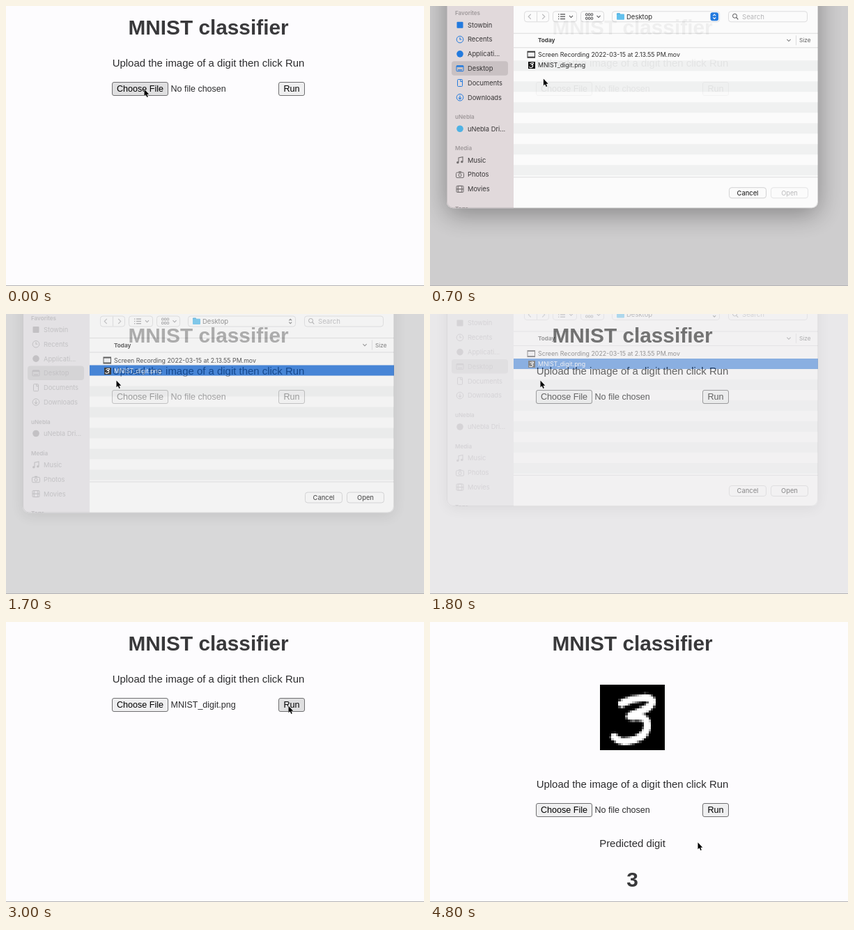
An HTML page with a canvas for the animation above (4900 ms loop, 600 px wide and 402 px high).

```html
<!DOCTYPE html>
<html lang="en">
<head>
<meta charset="utf-8">
<title>MNIST classifier</title>
<style>
  html, body { margin: 0; width: 100%; height: 100%; overflow: hidden; background: #fdfcfe; }
  canvas { display: block; }
</style>
</head>
<body>
<canvas id="stage" width="600" height="402"></canvas>
<script>
const W = 600, H = 402, LOOP = 4900, STEP = 100;
const OPEN = 500, SELECT = 1500, BLUR = 1600, CLOSED = 2000, RESULT = 3500;
const SANS = '"Liberation Sans", Arial, sans-serif';
const UI = 'Inter, Roboto, sans-serif';
const BLUE = '#1674e0', INK = '#39393b', EDGE = '#dededf';

const screen = document.getElementById('stage').getContext('2d');
const layer = newCanvas(W, H);
const digit = drawDigit();
let c = screen;

function newCanvas(w, h) {
  const el = document.createElement('canvas');
  el.width = w;
  el.height = h;
  return el.getContext('2d');
}

const glides = [
  { at: 400, ms: 400, x: 160, y: 103 },
  { at: 1000, ms: 400, x: 158, y: 95 },
  { at: 2200, ms: 450, x: 405, y: 120 },
  { at: 3900, ms: 600, x: 383, y: 323, power: 1 },
  { at: 4500, ms: 300, x: 384, y: 316 }
];

function pointer(t) {
  let x = 198, y = 119;
  for (const g of glides) {
    const u = Math.min(1, Math.max(0, (t - g.at) / g.ms));
    const k = 1 - (1 - u) ** (g.power || 2);
    x += (g.x - x) * k;
    y += (g.y - y) * k;
  }
  return { x, y };
}

// The sheet drops in with a decaying lag and leaves upwards
function sheet(t) {
  if (t <= BLUR) {
    const lag = Math.exp((OPEN - t) / 150);
    return { dy: -18 * lag, opacity: 1 - 0.28 * lag, dim: 0.225 - 0.135 * lag, lift: 6 * lag };
  }
  const u = (t - BLUR) / (CLOSED - BLUR);
  return { dy: -38 * u, opacity: (1 - u) ** 1.25, dim: 0.225 * (1 - u) ** 1.5, lift: 0 };
}

function text(s, x, y, size, color, font = UI, weight = 400, align = 'left') {
  c.font = `${weight} ${size}px ${font}`;
  c.textAlign = align;
  c.fillStyle = color;
  c.fillText(s, x, y);
}

function box(x, y, w, h, r, fill, stroke) {
  c.beginPath();
  c.roundRect(x, y, w, h, r);
  if (fill) { c.fillStyle = fill; c.fill(); }
  if (stroke) { c.strokeStyle = stroke; c.lineWidth = 1; c.stroke(); }
}

function rect(x, y, w, h, color) {
  c.fillStyle = color;
  c.fillRect(x, y, w, h);
}

function line(color, ...p) {
  c.beginPath();
  for (let i = 0; i < p.length; i += 2) c.lineTo(p[i], p[i + 1]);
  c.strokeStyle = color;
  c.lineWidth = 1.1;
  c.stroke();
}

function ring(x, y, r, color) {
  box(x - r, y - r, 2 * r, 2 * r, r, null, color);
}

function dot(x, y, r, color) {
  box(x - r, y - r, 2 * r, 2 * r, r, color);
}

const chevron = (x, y, w, h, color) => line(color, x - w, y - h, x, y + h, x + w, y - h);
const angle = (x, y, w, color) => line(color, x - w, y - 3.5, x + w, y, x - w, y + 3.5);

// A pen stroke on the 28 x 28 grid, rounded between a few points
function drawDigit() {
  const g = newCanvas(28, 28);
  const pen = [[9.5, 8], [14, 5.8], [23, 5.2], [22, 10], [10, 14], [21, 13.5], [20, 22], [10, 25], [6.3, 22.5]];
  g.fillRect(0, 0, 28, 28);
  g.strokeStyle = '#fff';
  g.lineWidth = 3.2;
  g.lineCap = g.lineJoin = 'round';
  g.beginPath();
  g.moveTo(...pen[0]);
  for (let i = 1; i < pen.length - 1; i++) {
    const [x, y] = pen[i], [u, v] = pen[i + 1];
    g.quadraticCurveTo(x, y, (x + u) / 2, (y + v) / 2);
  }
  g.lineTo(...pen.at(-1));
  g.stroke();
  return g.canvas;
}

function button(label, x, y, w, state) {
  const fill = { idle: '#efeff0', hover: '#dfdfe0', down: '#f6f6f6' }[state];
  box(x + 0.5, y + 0.5, w - 1, 19, 2.5, fill, '#6f6f71');
  text(label, x + w / 2, y + 14, 12.6, '#000', SANS, 400, 'center');
}

function form(t, pos) {
  const done = t >= RESULT, dy = done ? 151 : 0, top = 109 + dy;
  const free = t < OPEN || t >= CLOSED;
  const state = (x, w) => {
    const over = pos.x > x && pos.x < x + w && pos.y > top && pos.y < top + 20;
    return !free || !over ? 'idle' : t === 2900 ? 'down' : 'hover';
  };
  const heading = (s, y) => text(s, 290.5, y, 29.8, INK, SANS, 700, 'center');
  const label = (s, y) => text(s, 290.5, y, 14.95, '#2c2c2e', SANS, 400, 'center');

  heading('MNIST classifier', 41);
  label('Upload the image of a digit then click Run', 87 + dy);
  button('Choose File', 152, top, 81, state(152, 81));
  button('Run', 391, top, 38, state(391, 38));
  const file = t >= CLOSED && !done ? 'MNIST_digit.png' : 'No file chosen';
  text(file, 236.5, top + 14, 12.5, '#2c2c2e', SANS);
  if (done) {
    c.imageSmoothingEnabled = false;
    c.drawImage(digit, 243.5, 90.3, 93.7, 93.5);
    label('Predicted digit', 323);
    heading('3', 380);
  }
}

const icons = {
  plain(x, y, k) { box(x - 4.5, y - 4.5, 9, 9, 1, k); },
  round(x, y, k) { dot(x, y, 4.8, k); },
  clock(x, y, k) {
    ring(x, y, 4.8, k);
    line(k, x, y - 3, x, y, x + 2.4, y);
  },
  desk(x, y, k) {
    box(x - 5, y - 4, 10, 8, 1, null, k);
    rect(x - 5, y - 4, 10, 2, k);
    rect(x - 3, y + 1.5, 6, 1.2, k);
  },
  doc(x, y, k) {
    box(x - 3.5, y - 5, 7, 10, 1, null, k);
    line(k, x + 1, y - 5, x + 1, y - 2, x + 3.5, y - 2);
  },
  down(x, y, k) {
    ring(x, y, 4.8, k);
    line(k, x, y - 2.8, x, y + 2.5);
    chevron(x, y + 1.4, 2, 1.1, k);
  },
  note(x, y, k) {
    line(k, x - 2, y + 3, x - 2, y - 3.4, x + 4, y - 4.6, x + 4, y + 2);
    dot(x - 3.2, y + 3.4, 1.7, k);
    dot(x + 2.8, y + 2.4, 1.7, k);
  },
  photo(x, y, k) {
    box(x - 5.5, y - 3, 11, 7.5, 1.5, null, k);
    rect(x - 2, y - 4.6, 4, 1.6, k);
    ring(x, y + 0.7, 2.1, k);
  },
  film(x, y, k) {
    box(x - 5, y - 4.5, 10, 9, 1, null, k);
    box(x - 2.7, y - 4.5, 5.4, 9, 0, null, k);
    line(k, x - 5, y, x + 5, y);
  }
};

const groups = [
  { name: 'Favorites', color: BLUE, items: { Stowbin: 'plain', Recents: 'clock', 'Applicati...': 'round',
    Desktop: 'desk', Documents: 'doc', Downloads: 'down' } },
  { name: 'uNebla', color: '#45b0e6', items: { 'uNebla Dri...': 'round' } },
  { name: 'Media', color: '#6b6667', items: { Music: 'note', Photos: 'photo', Movies: 'film' } },
  { name: 'Tags', items: {} }
];

function sidebar(active) {
  const faded = '#bab8bc';
  rect(24, -60, 96, 360, active ? '#e3dbdd' : '#e8e6e9');
  box(31, 84, 81, 20.5, 4, active ? '#c9c1c3' : '#d5d3d6');
  let y = 15;
  for (const { name, color, items } of groups) {
    text(name, 36, y + 3, 8.1, active ? '#9c9597' : faded, UI, 600);
    y += 17;
    for (const [label, icon] of Object.entries(items)) {
      icons[icon](43, y, active ? color : faded);
      text(label, 54, y + 3.4, 9.3, active ? '#2b2829' : faded);
      y += 20.8;
    }
    y += 7.2;
  }
}

function toolbar(active) {
  const ink = active ? '#4c4c4e' : '#9a9a9c';
  const frame = (x, w) => box(x + 0.5, 12.5, w - 1, 15, 3.5, '#fff', EDGE);
  frame(135, 36);
  line(EDGE, 153.5, 13, 153.5, 27);
  angle(143, 20, -1.8, '#b9b9bb');
  angle(163, 20, 1.8, '#b9b9bb');

  frame(176, 35);
  frame(216, 34);
  for (let i = 0; i < 3; i++) {
    rect(184, 16 + i * 3.3, 1.4, 1.3, ink);
    rect(187, 16 + i * 3.3, 7, 1.3, ink);
    for (const y of [15.5, 21]) box(223.5 + i * 3.8, y, 2.6, 3, 0.5, null, ink);
  }
  chevron(202.5, 20, 2.5, 1.3, ink);
  chevron(242, 20, 2.5, 1.3, ink);

  frame(261, 155);
  box(268, 15, 5, 4, 1, '#39a5dc');
  box(268, 16.2, 11, 8.3, 1, '#5bc1f0');
  text('Desktop', 282, 23.4, 9.5, active ? '#222' : '#777');
  if (active) box(402.5, 14, 11.5, 12, 3, BLUE);
  for (const s of [-1, 1]) chevron(408.2, 20 + s * 2.2, 2, s, active ? '#fff' : '#777');

  frame(428, 114);
  ring(437.5, 19, 3, ink);
  line(ink, 439.7, 21.2, 442.3, 24);
  text('Search', 448, 23.4, 9.6, '#b4b4b6');
}

function list(lift, chosen) {
  for (let y = 83; y < 248; y += 30) rect(120, y, 437, 15, '#f3f4f4');
  if (chosen) rect(120, 83, 437, 15, '#0a62d6');
  c.save();
  c.beginPath();
  c.rect(120, 68, 437, 181);
  c.clip();
  c.translate(0, -lift);
  rect(139.5, 71, 11.5, 10, '#2a2a2a');
  rect(140.5, 73, 9.5, 6, '#f5f5f6');
  text('Screen Recording 2022-03-15 at 2.13.55 PM.mov', 155, 79.3, 8.8, '#222');
  c.drawImage(digit, 140.5, 86, 10, 10);
  text('MNIST_digit.png', 155, 94.3, 8.8, chosen ? '#fff' : '#222');
  c.restore();
}

function dialog(t, lift) {
  const chosen = t >= SELECT, active = t < BLUR;
  c.save();
  c.shadowColor = `rgba(0,0,0,${active ? 0.38 : 0.14})`;
  c.shadowBlur = active ? 36 : 20;
  c.shadowOffsetY = active ? 9 : 4;
  box(24, -60, 533, 355, 9, '#fff');
  c.restore();

  c.save();
  c.beginPath();
  c.roundRect(24, -60, 533, 355, 9);
  c.clip();
  sidebar(active);
  toolbar(active);
  for (const y of [43.5, 64, 250]) rect(120, y, 437, 1, EDGE);
  text('Today', 155, 57, 8.2, '#333', UI, 700);
  chevron(515, 54, 2.6, 1.3, '#777');
  rect(525, 47, 1, 14, EDGE);
  text('Size', 530, 57, 8.2, '#555');
  list(lift, chosen);
  const action = (s, x, on) => {
    box(x + 0.5, 265.5, 53, 15, 3.5, '#fff', on ? '#d2d2d3' : '#e6e6e7');
    text(s, x + 27, 276.3, 9.3, on ? '#222' : '#b9b9bb', UI, on ? 500 : 400, 'center');
  };
  action('Cancel', 429, true);
  action('Open', 489, chosen);
  c.restore();
  box(24.5, -60, 532, 354.5, 9, null, 'rgba(0,0,0,.13)');
}

function arrow({ x, y }) {
  c.save();
  c.translate(x + 0.5, y + 0.5);
  c.beginPath();
  c.moveTo(0, 0);
  c.lineTo(0, 9.8);
  c.lineTo(2.2, 7.7);
  c.lineTo(3.9, 11.4);
  c.lineTo(5.3, 10.8);
  c.lineTo(3.8, 7.2);
  c.lineTo(6.8, 7.2);
  c.closePath();
  c.lineJoin = 'round';
  c.strokeStyle = '#fff';
  c.stroke();
  c.fillStyle = '#000';
  c.fill();
  c.restore();
}

function render(t) {
  const pos = pointer(t);
  rect(0, 0, W, H, '#fdfcfe');
  form(t, pos);
  if (t >= OPEN && t < CLOSED) {
    const { dy, opacity, dim, lift } = sheet(t);
    rect(0, 0, W, H, `rgba(0,0,0,${dim})`);
    c = layer;
    c.clearRect(0, 0, W, H);
    c.save();
    c.translate(0, dy);
    dialog(t, lift);
    c.restore();
    c = screen;
    c.globalAlpha = opacity;
    c.drawImage(layer.canvas, 0, 0);
    // The page returns through the closing sheet
    if (t > BLUR) {
      c.globalAlpha = (1 - opacity) / 2;
      form(t, pos);
    }
    c.globalAlpha = 1;
  }
  rect(0, 401, W, 1, '#b4b3b5');
  c.lineWidth = 1;
  arrow(pos);
}

const start = performance.now();
function tick() {
  const t = (performance.now() - start) % LOOP;
  render(Math.floor(t / STEP) * STEP);
  requestAnimationFrame(tick);
}
tick();
</script>
</body>
</html>
```
